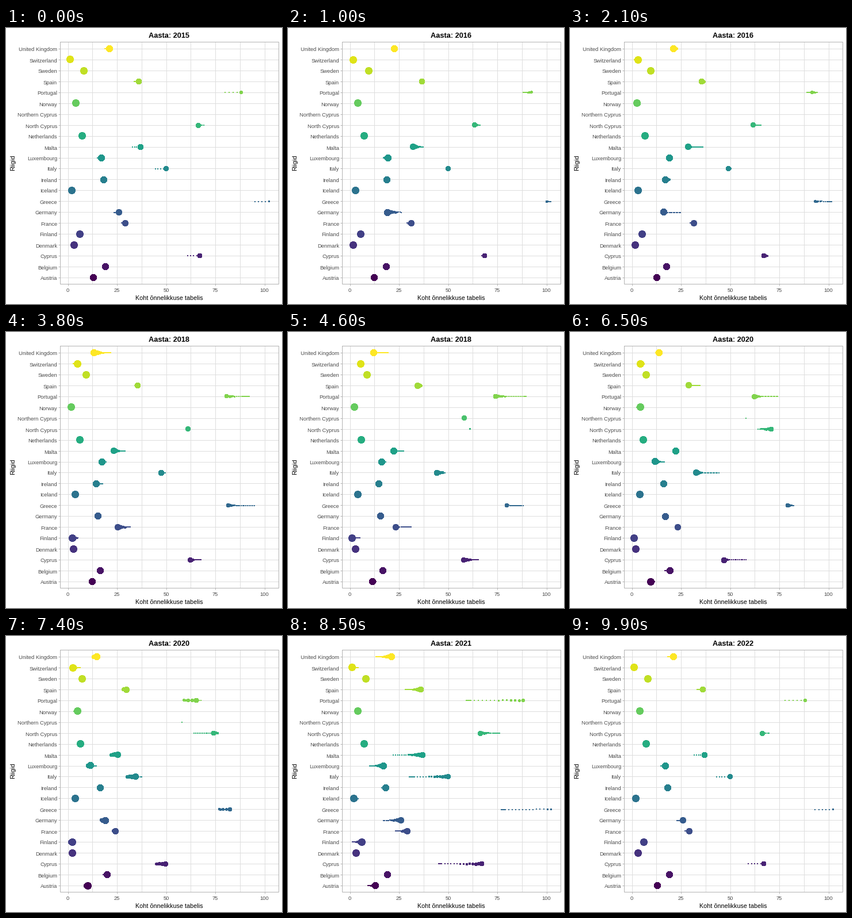
A matplotlib script that plays this animation: 480 px wide and 480 px high, repeating every 10000 ms.

```python
import numpy as np
import matplotlib.pyplot as plt
from matplotlib.animation import FuncAnimation

W = H = 480
FRAMES, WAKE = 100, 19
FIRST, LAST = 2015, 2022
plt.rcParams["font.family"] = ["Liberation Sans", "DejaVu Sans"]

# Ranks for 2015-2020, top row first; the last two years repeat the first.
NA = np.nan
RANKS = {
    "United Kingdom": [21, 23, 19, 11, 15, 13],
    "Switzerland": [1, 2, 4, 5, 6, 3],
    "Sweden": [8, 10, 9, 9, 7, 7],
    "Spain": [36, 37, 34, 36, 30, 28],
    "Portugal": [88, 94, 89, 77, 66, 59],
    "Norway": [4, 4, 1, 2, 3, 5],
    "Northern Cyprus": [NA, NA, NA, 58, NA, NA],
    "North Cyprus": [66, 62, 61, NA, 64, 76],
    "Netherlands": [7, 7, 6, 6, 5, 6],
    "Malta": [37, 30, 27, 22, 22, 22],
    "Luxembourg": [17, 20, 18, 17, 14, 10],
    "Italy": [50, 50, 48, 47, 36, 30],
    "Ireland": [18, 19, 15, 14, 16, 16],
    "Iceland": [2, 3, 3, 4, 4, 4],
    "Greece": [102, 99, 87, 79, 82, 77],
    "Germany": [26, 16, 16, 15, 17, 17],
    "France": [29, 32, 31, 23, 24, 23],
    "Finland": [6, 5, 5, 1, 1, 1],
    "Denmark": [3, 1, 2, 3, 2, 2],
    "Cyprus": [67, 69, 65, 61, 49, 45],
    "Belgium": [19, 18, 17, 16, 18, 20],
    "Austria": [13, 12, 13, 12, 10, 9],
}
NAMES = list(RANKS)
N = len(NAMES)
ranks = np.array(list(RANKS.values()), float).T
ranks = np.vstack([ranks, ranks[0], ranks[0]])

# Happiness score as a function of rank; it sets the dot size.
SCORE_RANK = [1, 4, 8, 13, 19, 26, 36, 50, 66, 77, 88, 102]
SCORE = [7.6, 7.5, 7.35, 7.2, 6.93, 6.7, 6.33, 5.95, 5.69, 5.45, 5.12, 4.857]
score = np.interp(ranks, SCORE_RANK, SCORE)
sizes = 1 + 5 * np.sqrt((score - 4.857) / (7.809 - 4.857))

KEYS = np.round(np.arange(LAST - FIRST + 1) * (FRAMES - 1) / (LAST - FIRST))


def tween(states):
    """Linear tween; a row missing from the next state holds until then."""
    out = []
    for f in range(FRAMES):
        i = min(np.searchsorted(KEYS, f, side="right") - 1, len(KEYS) - 2)
        t = (f - KEYS[i]) / (KEYS[i + 1] - KEYS[i])
        a, b = states[i], states[i + 1]
        out.append(a + (np.where(np.isnan(b), a, b) - a) * t)
    return np.array(out)


def px(rank):
    return 108.1 + 3.42 * rank


def pixel(v):
    return np.floor(v + 0.5)


rows = 35.9 + 18.96 * np.arange(N)
colors = plt.get_cmap("viridis")(np.linspace(1, 0, N))
xs = px(tween(ranks))
ss = tween(np.where(np.isnan(ranks), np.nan, sizes))

fig = plt.figure(figsize=(W / 72, H / 72), dpi=72, facecolor="white")
ax = fig.add_axes([0, 0, 1, 1])
ax.set(xlim=(0, W), ylim=(H, 0))
ax.axis("off")

L, R, T, B = 94.5, 474.5, 24.5, 445.5


def line(x, y, color, z=1):
    ax.plot(x, y, color=color, lw=1, zorder=z, snap=False,
            solid_capstyle="butt", solid_joinstyle="miter")


def label(x, y, s, size, **kw):
    return ax.text(x, y, s, fontsize=size, va="baseline", **kw)


GRID, EDGE, INK = "#dedede", "#b3b3b3", "#4d4d4d"
for v in np.arange(0, 101, 12.5):
    x = np.floor(px(v)) + 0.5
    line([x, x], [T, B], GRID)
    if v % 25 == 0:
        line([x, x], [B, B + 3], EDGE)
        label(x - 1, 459, f"{v:.0f}", 9.4, color=INK, ha="center")
for name, y in zip(NAMES, rows):
    g = pixel(y) + 0.5
    line([L, R], [g, g], GRID)
    line([L - 3, L], [g, g], EDGE)
    label(89, g + 4, name, 9.4, color=INK, ha="right")
line([L, R, R, L, L], [T, T, B, B, T], EDGE, 5)

label(283.5, 473, "Koht õnnelikkuse tabelis", 10.7, ha="center")
label(15.5, 234.5, "Riigid", 10.7, ha="center", rotation=90,
      rotation_mode="anchor")
title = label(283.5, 17, "", 12.8, ha="center", weight="bold")
dots = ax.scatter([], [], linewidths=0, antialiased=False, zorder=3)


def disc(x, y, size):
    """Centre and diameter of a dot whose box sits on whole pixels."""
    r = np.maximum(0.375 * (size * 2.845 + 0.945), 1)
    left, top = pixel(x - r), pixel(y - r)
    d = pixel(2 * r)
    return np.c_[left + d / 2, top + d / 2], d


def draw(f):
    pts, area, cols = [], [], []
    for k in range(WAKE, -1, -1):
        j = (f - k) % FRAMES
        fade = ((WAKE - k) / (WAKE + 1)) ** 3 if k else 1
        ok = ~np.isnan(xs[j])
        centre, d = disc(xs[j][ok], rows[ok] + 0.2, ss[j][ok] * fade)
        pts.append(centre)
        area.append((d - 0.7) ** 2)  # hard edges fill every touched pixel
        cols.append(colors[ok])
    dots.set_offsets(np.vstack(pts))
    dots.set_sizes(np.concatenate(area), dpi=72)
    dots.set_facecolors(np.vstack(cols))
    year = FIRST + (LAST - FIRST) * f / (FRAMES - 1)
    title.set_text(f"Aasta: {round(year)}")
    return dots, title


anim = FuncAnimation(fig, draw, frames=FRAMES, interval=100, repeat=True,
                     repeat_delay=0, init_func=lambda: draw(0))
plt.show()
```
